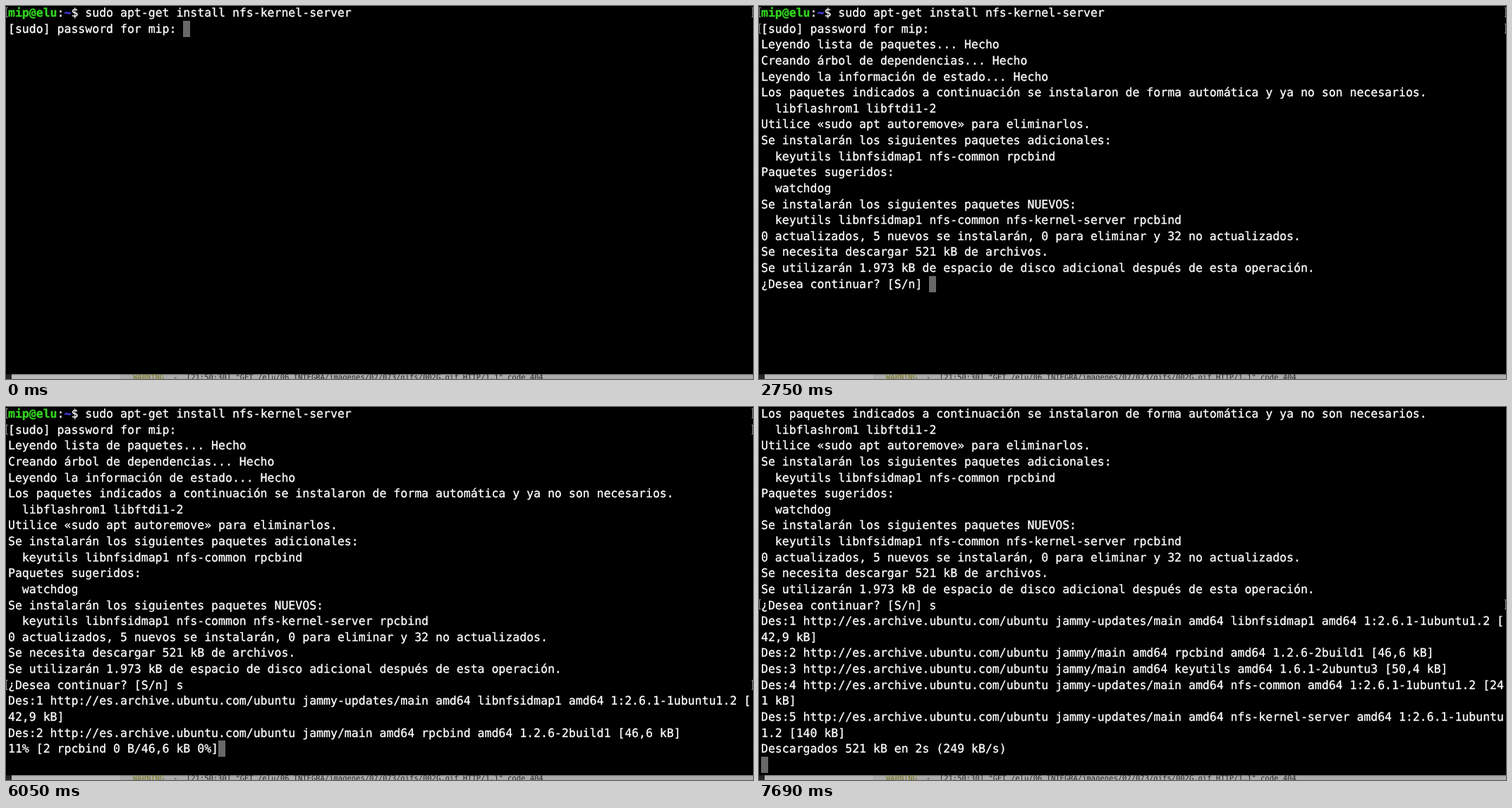
Write an HTML page that moves like this. It is 1059 px wide and 529 px high and loops after 8000 ms.

```html
<!DOCTYPE html>
<html lang="es">
<head>
<meta charset="utf-8">
<style>
  html, body { margin: 0; width: 100%; height: 100%; overflow: hidden; background: #000; }
  #stage { position: relative; width: 1059px; height: 529px; overflow: hidden; background: #000; }
  #stage * { position: absolute; margin: 0; white-space: pre; text-rendering: geometricPrecision; }
  #stage pre * { position: static; }
  pre { font-family: "DejaVu Sans Mono", Menlo, monospace; }
  #screen { left: 3px; top: -1px; color: #fff; font-size: 16.5px; line-height: 22.62px; -webkit-text-stroke: 0.3px; }
  .user { color: #33d31f; font-weight: bold; }
  .dir { color: #4a3cf5; font-weight: bold; }
  #cursor { width: 10px; height: 23px; background: #686868; }
  .mark { width: 2px; height: 12px; border: 1px solid #8a8a8a; }
  .left { left: 0; border-right: 0; }
  .right { left: 1057px; border-left: 0; width: 1px; }
  #behind { left: 0; top: 522px; width: 1059px; height: 7px; overflow: hidden;
    background: linear-gradient(#0006, #0000 2px), linear-gradient(90deg, #252525 8px, #b9b9b9 8px 162px, #adadad 162px); }
  #behind pre { left: 180px; top: -1px; font-size: 10.5px; line-height: 12px; color: #222; }
  #behind b { font-weight: normal; color: #77751c; }
</style>
</head>
<body>
<div id="stage">
  <div id="cursor"></div>
  <pre id="screen"></pre>
  <div id="marks"></div>
  <div id="behind"><pre><b>WARNING</b>  -  [21:50:30] "GET /elu/06_INTEGRA/imagenes/07/073/gifs/002G.gif HTTP/1.1" code 404</pre></div>
</div>
<script>
const LOOP = 8000, ROWS = 23, COLS = 106, ROW_H = 22.62, COL_W = 9.934;
const $ = id => document.getElementById(id);

const prompt = '<span class="user">mip@elu</span>:<span class="dir">~</span>$ sudo apt-get install nfs-kernel-server';
const password = '[sudo] password for mip: ';
const question = '¿Desea continuar? [S/n] ';
const fetched = (n, suite, pkg, version, size) =>
  `Des:${n} http://es.archive.ubuntu.com/ubuntu ${suite}/main amd64 ${pkg} amd64 ${version} [${size} kB]`;
const wrap = line => line.match(new RegExp(`.{1,${COLS}}`, 'g'));

const log = [prompt, ...[
  password,
  'Leyendo lista de paquetes... Hecho',
  'Creando árbol de dependencias... Hecho',
  'Leyendo la información de estado... Hecho',
  'Los paquetes indicados a continuación se instalaron de forma automática y ya no son necesarios.',
  '  libflashrom1 libftdi1-2',
  'Utilice «sudo apt autoremove» para eliminarlos.',
  'Se instalarán los siguientes paquetes adicionales:',
  '  keyutils libnfsidmap1 nfs-common rpcbind',
  'Paquetes sugeridos:',
  '  watchdog',
  'Se instalarán los siguientes paquetes NUEVOS:',
  '  keyutils libnfsidmap1 nfs-common nfs-kernel-server rpcbind',
  '0 actualizados, 5 nuevos se instalarán, 0 para eliminar y 32 no actualizados.',
  'Se necesita descargar 521 kB de archivos.',
  'Se utilizarán 1.973 kB de espacio de disco adicional después de esta operación.',
  question + 's',
  fetched(1, 'jammy-updates', 'libnfsidmap1', '1:2.6.1-1ubuntu1.2', '42,9'),
  fetched(2, 'jammy', 'rpcbind', '1.2.6-2build1', '46,6'),
  fetched(3, 'jammy', 'keyutils', '1.6.1-2ubuntu3', '50,4'),
  fetched(4, 'jammy-updates', 'nfs-common', '1:2.6.1-1ubuntu1.2', '241'),
  fetched(5, 'jammy-updates', 'nfs-kernel-server', '1:2.6.1-1ubuntu1.2', '140'),
  'Descargados 521 kB en 2s (249 kB/s)',
].flatMap(wrap)];

// [start ms, finished lines, text on the cursor line]
const steps = [
  [0, 1, password],
  [500, 2, ''],
  [650, 3, 'Creando árbol de dependencias... 0%'],
  [950, 5, ''],
  [1850, 12, ''],
  [2750, 17, question],
  [4700, 17, question + 's'],
  [5600, 18, '0% [Trabajando]'],
  [5900, 20, '0% [1 libnfsidmap1 0 B/42,9 kB 0%]'],
  [6050, 21, '11% [2 rpcbind 0 B/46,6 kB 0%]'],
  [6490, 24, '31% [4 nfs-common 0 B/241 kB 0%]'],
  [6940, 24, '61% [4 nfs-common 164 kB/241 kB 68%]'],
  [7240, 26, '74% [5 nfs-kernel-server 0 B/140 kB 0%]'],
  [7690, 27, ''],
];
const inputRows = [0, 1, 17];

function show([, done, tail]) {
  const scroll = Math.max(0, done + 1 - ROWS);
  const top = row => (row - scroll) * ROW_H - 2;
  $('screen').innerHTML = [...log.slice(scroll, done), tail].join('\n');
  $('cursor').style.left = 3 + tail.length * COL_W + 'px';
  $('cursor').style.top = Math.round(top(done) + 0.4) + 'px';
  $('marks').innerHTML = inputRows.filter(r => r < done && r >= scroll).map(r =>
    ['left', 'right'].map(side => `<i class="mark ${side}" style="top:${Math.round(top(r) + 4)}px"></i>`).join('')
  ).join('');
}

let current;
function frame() {
  const t = performance.now() % LOOP;
  const step = steps.findLast(s => s[0] <= t);
  if (step !== current) show(current = step);
  requestAnimationFrame(frame);
}
frame();
</script>
</body>
</html>
```
